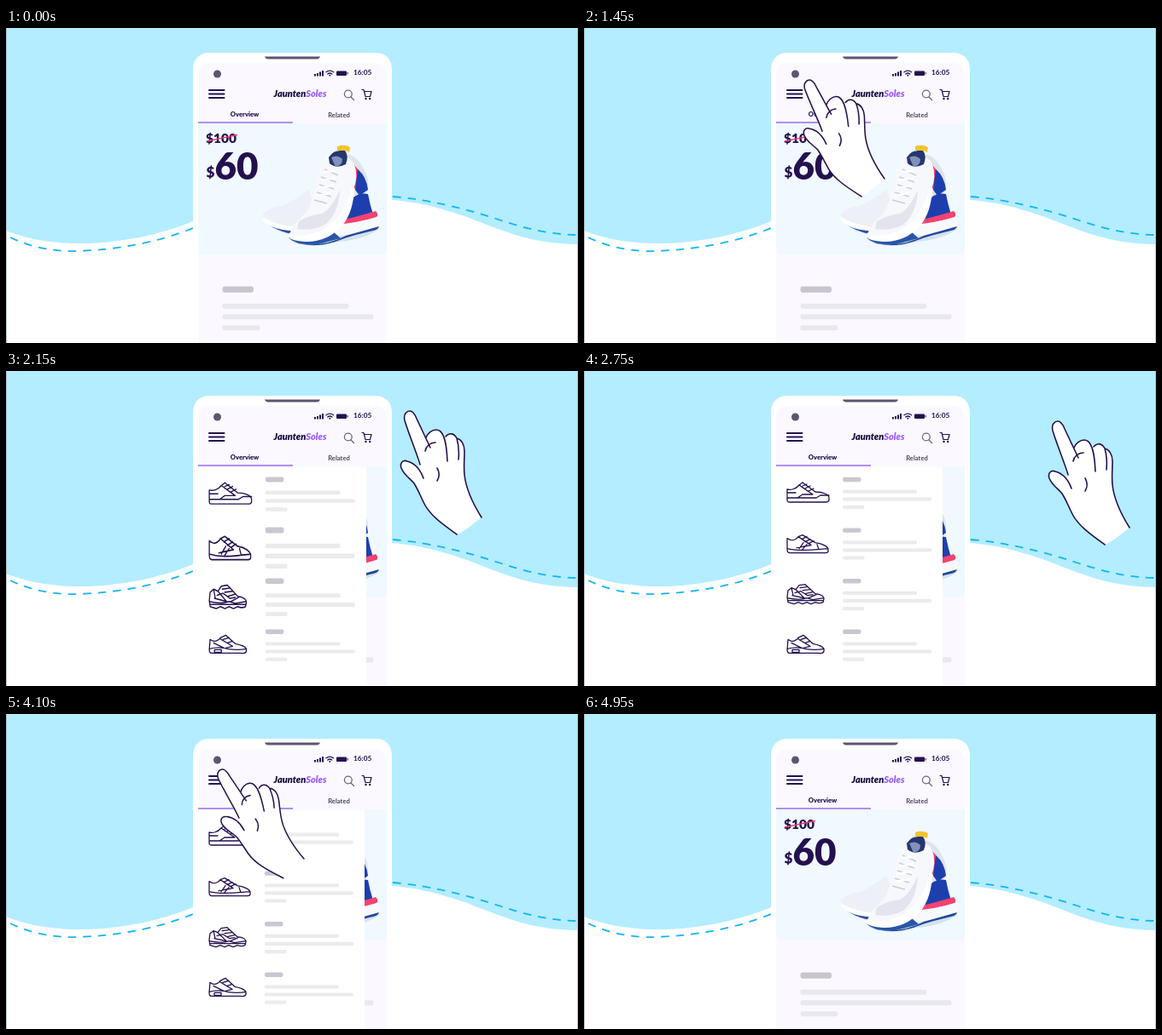
An HTML page that plays this animation: 670 by 370 pixels, repeating every 5.95 s.

```html
<!DOCTYPE html>
<html lang="en">
<head>
<meta charset="utf-8">
<title>Shop menu</title>
<style>
  html, body { margin: 0; width: 100%; height: 100%; overflow: hidden; background: #fff; }
  svg { display: block; width: 670px; height: 370px; }
  text { font-family: Lato, Inter, sans-serif; font-weight: 900; fill: #25104f; }
  .line { fill: none; stroke: #25104f; stroke-linecap: round; stroke-linejoin: round; }
</style>
</head>
<body>
<svg viewBox="0 0 670 370">
  <rect width="670" height="370" fill="#fff"/>
  <path fill="#b3edff" d="M0 0H670V254C612 253 585 239 540 222C505 210 480 204 452 202L219 227C190 239 140 254 80 253C45 252 20 246 0 238Z"/>
  <g fill="none" stroke="#12b5f5" stroke-width="1.8" stroke-dasharray="9.5 8">
    <path d="M5 246C30 258 58 263 85 262C135 260 180 251 219 235"/>
    <path d="M453 198C500 202 540 213 580 226C610 236 640 243 670 243"/>
  </g>
  <path d="M.5 0V370M669.5 0V370" stroke="#a9b6bd" stroke-opacity=".8"/>

  <!-- phone -->
  <path fill="#fff" d="M219 370V50Q219 29 240 29H431Q452 29 452 50V370Z"/>
  <path fill="#fbf9ff" d="M225 370V56Q225 41 240 41H431Q446 41 446 56V370Z"/>
  <path fill="#5b5670" d="M303 33.5H368Q367 36.5 364 36.5H307Q304 36.5 303 33.5Z"/>
  <circle cx="247.5" cy="54" r="4.5" fill="#5b5670"/>
  <g fill="#25104f">
    <path d="M361 54h2v2.500h-2zM364 53h2v3.500h-2zM367 51.500h2v5h-2zM370 50h2v6.500h-2z"/>
    <rect x="387" y="50.500" width="12" height="5.500" rx="1"/>
    <rect x="399.600" y="52" width="1" height="2.500"/>
    <circle cx="379.300" cy="55.800" r="1"/>
  </g>
  <path class="line" stroke-width="1.300" d="M375 51.800Q379.300 48.600 383.600 51.800M376.800 54Q379.300 52 381.800 54"/>
  <text x="407" y="55.300" font-size="8.300" style="font-weight:700">16:05</text>
  <path stroke="#25104f" stroke-width="2" stroke-linecap="round" d="M238 73H255.500M238 77.500H255.500M238 82H255.500"/>
  <text x="344.500" y="80.500" font-size="11" font-style="italic" text-anchor="middle" style="fill:#160b3f">Jaunten<tspan fill="#9a5cff">Soles</tspan></text>
  <g fill="none" stroke="#6b667c" stroke-width="1.300" stroke-linecap="round">
    <circle cx="400.800" cy="77.500" r="4.400"/><path d="M404 81L407.500 84.500"/>
  </g>
  <path class="line" stroke-width="1.200" d="M417 72.500H419L421 80.500H426.500L428 74.500H419.700"/>
  <path fill="#25104f" d="M420.300 83a1.200 1.200 0 1 0 2.400 0a1.200 1.200 0 1 0-2.400 0M425 83a1.200 1.200 0 1 0 2.400 0a1.200 1.200 0 1 0-2.400 0"/>
  <text x="279.500" y="104" font-size="7.600" text-anchor="middle">Overview</text>
  <text x="390" y="105.200" font-size="7.600" text-anchor="middle" style="font-weight:700;fill:#4a4360">Related</text>

  <!-- offer -->
  <path fill="#eff9ff" d="M225 112H446V258Q446 266 438 266H233Q225 266 225 258Z"/>
  <path stroke="#b08ef5" stroke-width="2" d="M225 111H336"/>
  <text x="234" y="135.300" font-size="15.500">$100</text>
  <path stroke="#ee3d6b" stroke-width="1.400" d="M235 133L271 125.500"/>
  <text x="234.500" y="174.500" font-size="17">$</text>
  <text x="244.500" y="177.500" font-size="44">60</text>

  <!-- pair of shoes -->
  <g>
    <path fill="#d5e2ec" d="M304 228Q330 246 370 252Q415 252 437 236L400 225Z"/>
    <path fill="#2a52a3" d="M301 220Q302 233 330 241L362 240L350 228Z"/>
    <path fill="#edf0f6" d="M301 219Q308 210 324 209Q340 201 354 190L366 220L346 236Q313 236 301 223Z"/>
    <path fill="#fff" d="M301 222Q320 234 346 234V239Q310 238 301 226Z"/>
    <path fill="#dfe3ec" d="M400 148Q413 152 419 166Q425 174 424 190L413 208H398Z"/>
    <path fill="#f4426f" d="M407 160L415 169L411 190L406 187Z"/>
    <path fill="#1d3fae" d="M412 166Q422 174 424 190L414 197L409 190ZM400 206Q410 192 424 195Q426 206 430 219L394 226Z"/>
    <path fill="#f4426f" d="M392 226Q410 222 433 215Q437 219 434 222Q412 229 388 232Z"/>
    <path fill="#f8f9fc" d="M384 231Q412 229 435 222Q440 228 436 233Q415 241 376 247Z"/>
    <path fill="#20489c" d="M337 252Q370 259 398 244L437 233Q436 237 430 238Q400 245 386 251Q362 259 337 252Z"/>
    <path fill="#2856a8" d="M331 246Q339 256 366 254L392 247L383 239Z"/>
    <path fill="#f7f8fc" d="M331 244Q336 230 351 217Q358 208 361 188Q367 164 372 151Q380 145 388 148Q403 150 408 160Q413 174 407 190Q405 214 392 231Q378 248 353 250Q336 250 331 244Z"/>
    <path fill="#e2e5ee" d="M343 227Q357 219 370 218Q381 213 391 190Q390 217 374 231Q358 239 341 236Z"/>
    <path fill="#fff" d="M331 243Q358 247 377 233Q398 216 405 187L408 188Q407 216 394 232Q376 252 350 251Q335 250 331 246Z"/>
    <path fill="#26366f" d="M378 152Q384 142 397 144Q402 150 398 160Q387 166 379 159Z"/>
    <path fill="#8191bb" d="M381 152Q388 148 394 154Q394 162 386 163Z"/>
    <path fill="#f5c32f" d="M388 139Q396 136 403 140L402 146Q394 142 388 145Z"/>
    <path fill="none" stroke="#c9cedb" stroke-width="1.600" d="M373 166L389 173M369 175L387 181M367 184L384 189M364 193L381 198M361 202L376 206"/>
    <path fill="none" stroke="#fff" stroke-width="2.600" d="M372 169L386 168M369 179L386 176M366 188L384 185M364 197L380 194"/>
  </g>

  <g id="skeleton"></g>
  <g id="menu"><rect x="225" y="112.500" width="195" height="258" fill="#fff"/></g>

  <g id="hand">
    <path fill="#fff" d="M55 144C40 133 24 122 17 108C12 98 10 92 5 84C0 78-7 74-10 66C-12 60-8 56-3 58C3 60 7 62 11 66C8 48-2 24-6 10C-8 2-3-1 0-1C4-1 6 3 8 8L19 30C21 25 26 21 31 21C37 21 40 25 42 29C46 24 52 25 55 31C60 32 64 38 64 46C64 56 63 64 64 74C66 92 74 108 84 124C76 130 65 140 55 144Z"/>
    <path class="line" stroke-width="1.600" d="M55 144C40 133 24 122 17 108C12 98 10 92 5 84C0 78-7 74-10 66C-12 60-8 56-3 58C5 60 12 67 16 78M12 62C8 48-2 24-6 10C-8 2-3-1 0-1C4-1 6 3 8 8L24 42M19 30C21 25 26 21 31 21C40 21 43 36 44 58M18 46C19 40 24 36 30 36M42 29C46 24 52 25 55 31C57 38 58 46 57 56M55 31C60 32 64 38 64 46C64 56 63 64 64 74C66 92 74 108 84 124M32 66C35 71 35 76 32 81"/>
  </g>
</svg>
<script>
const LOOP = 5950, STEP = 50, ROW_GAP = 59.6, LEFT = 225;
const $ = id => document.getElementById(id);

function add(parent, tag, attrs) {
  const el = document.createElementNS('http://www.w3.org/2000/svg', tag);
  for (const key in attrs) el.setAttribute(key, attrs[key]);
  return parent.appendChild(el);
}
const bar = (parent, x, y, width, height, fill) =>
  add(parent, 'rect', { x, y, width, height, rx: height / 2.5, fill });

bar($('skeleton'), 253.5, 303.5, 36.5, 7.2, '#c8c5d1');
[[148, 323.7], [177, 336.2], [44, 349.2]].forEach(([w, y]) => bar($('skeleton'), 253.5, y, w, 6, '#eae8ef'));

// Sneaker drawings, each in a box that starts at its heel
const sneakers = [
  'M1 8C5 9 11 8 15 3L19 0L34 11C43 11 50 14 50 18V20Q50 23 46 23H3Q1 23 1 20ZM1 18H35L40 15H50M15 3L31 14H19L13 18M19 4L24 2M22 7L28 4M26 10L32 7M1 12H11',
  'M1 4C5 7 10 7 14 2L19 0L34 9C43 10 49 14 49 17V19Q49 21 46 21H4Q1 21 1 17ZM1 16C17 20 34 17 49 16M14 2L29 12L12 15M18 5L24 2M22 8L28 5M26 10L32 7M15 16L20 9M19 17L24 11M36 11L38 17',
  'M2 7L6 4L11 6L15 1L22 0L34 11Q44 12 44 17L43 21Q39 23 34 21L29 23L24 21L19 23L14 21L9 23L2 21L1 15ZM1 16Q15 19 24 16L31 18L44 16M2 19H43M11 6L21 16L7 13M16 4L24 3M19 7L28 6M22 11L31 9M10 10L17 8L25 13L31 12M6 4L8 13M26 16L35 12',
  'M2 5Q8 10 14 3L20 0L31 10Q42 12 44 16V19Q43 22 38 21H5Q1 22 1 17ZM1 16Q12 13 22 16Q34 18 44 16M7 20V17H15V20ZM13 4L28 13L20 15M17 5L24 3M22 9L28 7M6 9L18 15'
];
const sneakerTop = [3.5, 5.5, 4, 4];

const rows = sneakers.map((d, i) => {
  const row = add($('menu'), 'g', {});
  add(row, 'path', { class: 'line', 'stroke-width': 1.3, d, transform: `translate(237 ${sneakerTop[i]})` });
  bar(row, 303, -2.7, 21.5, 5.4, '#c9c7d2');
  [[87, 14.2], [104, 23.2], [25.5, 32.4]].forEach(([w, y]) => bar(row, 303, y - 2.1, w, 4.2, '#ebebee'));
  return row;
});

// time, tip x, tip y, turn, size
const handKeys = [
  [900, 668, 144, 0, 1], [1050, 590, 119, 0, 1], [1250, 372, 72, 0, 1],
  [1450, 264, 62, -3.3, .967], [1700, 254, 66, -8.6, .945], [1850, 272, 58, -5, .97],
  [1950, 338, 49, -2, 1], [2050, 418, 46, 0, 1], [2150, 473, 48, 0, 1], [2350, 528, 54, 0, 1],
  [2750, 555, 60, 0, 1], [3200, 566, 61, 0, 1], [3300, 554, 61, 0, 1],
  [3450, 484, 62, 0, 1], [3650, 365, 61, 0, 1], [3850, 284, 62, -3, .97],
  [4100, 253, 66, -8.6, .945], [4180, 251, 66, -9, .945], [4300, 296, 56, -4, .98],
  [4450, 411, 50, 0, 1], [4600, 495, 64, 0, 1], [4900, 655, 132, 0, 1], [4950, 690, 146, 0, 1]
];
const menuKeys = [
  [1700, 0], [1800, .45], [1900, .93], [2000, 1.03], [2150, 1.01], [2300, .997], [2450, 1],
  [4150, 1], [4230, .8], [4320, .25], [4400, 0]
];
const popKeys = [[-120, 0], [0, 1], [70, 1.2], [140, 1.3], [210, 1.08], [290, .94], [400, 1.03], [520, 1]];

// Smooth value of one column, level at its turning points
function sample(keys, t, col = 1) {
  const last = keys.length - 1;
  if (t <= keys[0][0]) return keys[0][col];
  if (t >= keys[last][0]) return keys[last][col];
  const i = keys.findIndex(k => k[0] > t) - 1;
  const slope = n => (keys[n + 1][col] - keys[n][col]) / (keys[n + 1][0] - keys[n][0]);
  const tangent = n => {
    if (n === 0 || n === last) return slope(Math.min(n, last - 1));
    const a = slope(n - 1), b = slope(n);
    return a * b <= 0 ? 0 : 2 * a * b / (a + b);
  };
  const span = keys[i + 1][0] - keys[i][0], u = (t - keys[i][0]) / span, v = 1 - u;
  return keys[i][col] * v * v * (1 + 2 * u) + keys[i + 1][col] * u * u * (3 - 2 * u)
    + span * u * v * (tangent(i) * v - tangent(i + 1) * u);
}

function draw(t) {
  const [x, y, turn, size] = [1, 2, 3, 4].map(col => sample(handKeys, t, col));
  $('hand').setAttribute('transform', `translate(${x} ${y}) rotate(${turn}) scale(${size})`);
  $('hand').style.display = t >= 900 && t < 4950 ? '' : 'none';

  const open = sample(menuKeys, t);
  $('menu').setAttribute('transform', `translate(${LEFT * (1 - open)} 0) scale(${open} 1)`);
  $('menu').style.display = open > 0 ? '' : 'none';
  rows.forEach((row, i) => {
    const stretch = sample(popKeys, t - 1940 - i * 70);
    row.setAttribute('transform', `translate(0 ${127.5 + i * ROW_GAP}) scale(1 ${stretch})`);
  });
}

const start = performance.now();
function tick() {
  const t = (performance.now() - start) % LOOP;
  draw(Math.floor(t / STEP) * STEP);
  requestAnimationFrame(tick);
}
tick();
</script>
</body>
</html>
```
